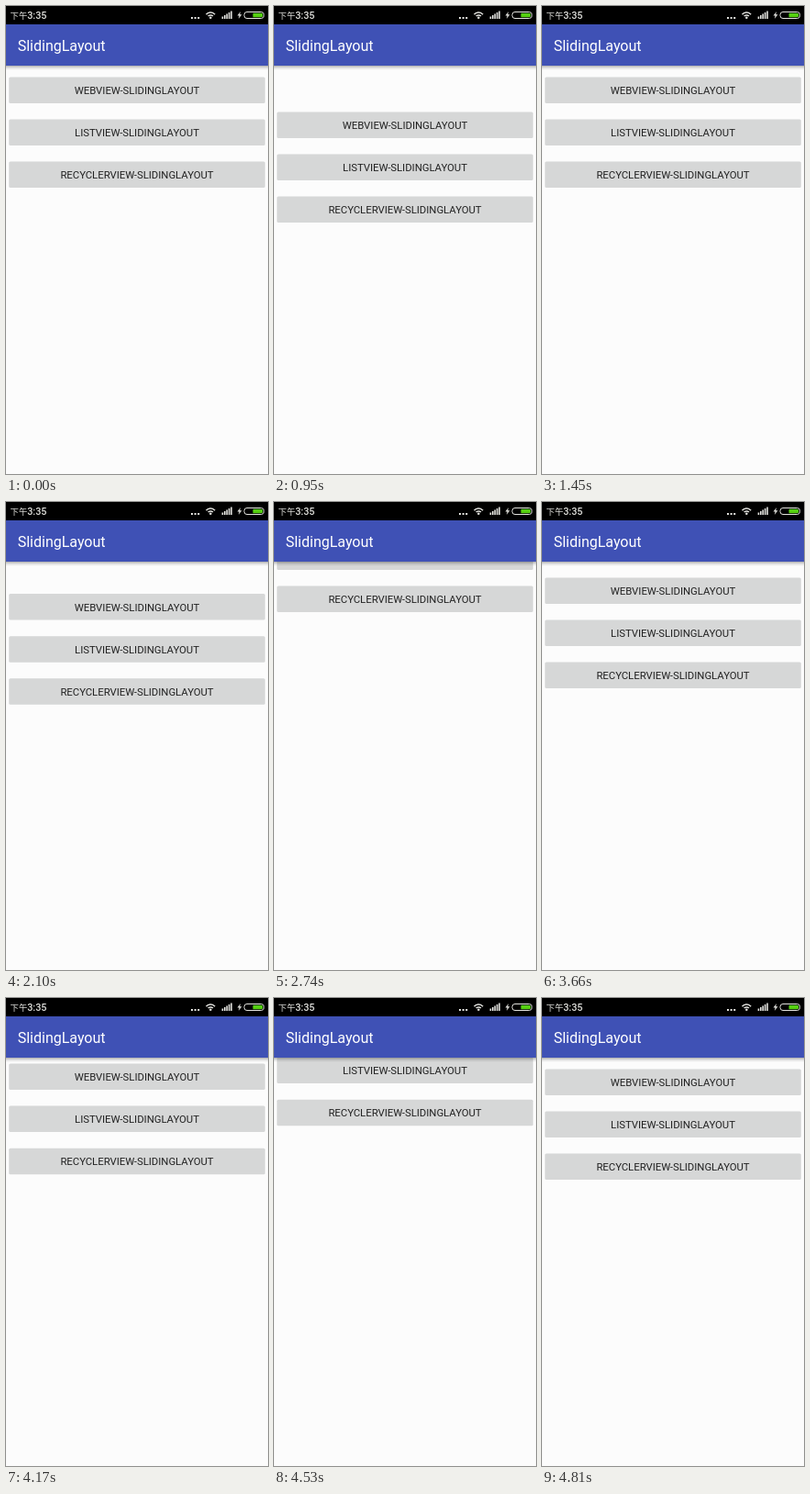
An HTML page with a canvas that plays this animation: 286 by 510 pixels, repeating every 4.84 s.

```html
<!DOCTYPE html>
<html lang="zh">
<head>
<meta charset="utf-8">
<title>SlidingLayout</title>
<style>
html, body { margin: 0; width: 100%; height: 100%; overflow: hidden; background: #fcfcfc; }
canvas { display: block; width: 286px; height: 510px; }
</style>
</head>
<body>
<canvas id="stage" width="286" height="510"></canvas>
<script>
const ctx = document.getElementById('stage').getContext('2d');
const LOOP = 4840;
const LIGHT = '#e2e2de';
const LABELS = ['WEBVIEW', 'LISTVIEW', 'RECYCLERVIEW'].map(name => name + '-SLIDINGLAYOUT');

// Each drag: number of screen updates and [time, offset] points along the finger's path,
// ending with the release back to rest.
const DRAGS = [
  { steps: 27, keys: [[700, 4], [950, 38], [1205, 71], [1450, 0]] },
  { steps: 15, keys: [[1760, 6], [1950, 75], [2180, 0]] },
  { steps: 28, keys: [[2460, -6], [2740, -78], [2960, -16], [3030, 26], [3240, 0]] },
  { steps: 41, keys: [[3660, 5], [3900, 68], [4165, -6], [4440, -75], [4700, 17], [4745, 45], [4810, 0]] }
];

const slope = ([t0, y0], [t1, y1]) => (y1 - y0) / (t1 - t0);

// Abrupt start, soft stop, flat at turning points.
function tangent(keys, i) {
  if (i === 0) return slope(keys[0], keys[1]);
  if (i === keys.length - 1) return 0;
  const before = slope(keys[i - 1], keys[i]);
  const after = slope(keys[i], keys[i + 1]);
  return before * after <= 0 ? 0 : 2 * before * after / (before + after);
}

function hermite(keys, t) {
  const i = Math.max(1, keys.findIndex(key => key[0] > t));
  const [t0, y0] = keys[i - 1];
  const [t1, y1] = keys[i];
  const span = t1 - t0;
  const p = (t - t0) / span;
  const q = 1 - p;
  return y0 * (1 + 2 * p) * q * q + y1 * (3 - 2 * p) * p * p
    + span * p * q * (tangent(keys, i - 1) * q - tangent(keys, i) * p);
}

function slideOffset(time) {
  const drag = DRAGS.find(({ keys }) => time >= keys[0][0] && time < keys[keys.length - 1][0]);
  if (!drag) return 0;
  const { keys, steps } = drag;
  const start = keys[0][0];
  const step = (keys[keys.length - 1][0] - start) / steps;
  return hermite(keys, start + Math.floor((time - start) / step + 1e-6) * step);
}

function rect(x, y, w, h, color) {
  ctx.fillStyle = color;
  ctx.fillRect(x, y, w, h);
}

function pill(x, y, w, h, r) {
  ctx.beginPath();
  ctx.roundRect(x, y, w, h, r);
}

function text(str, x, y, font, color, align = 'left') {
  ctx.font = font;
  ctx.fillStyle = color;
  ctx.textAlign = align;
  ctx.fillText(str, x, y);
}

function drawButtons(offset) {
  LABELS.forEach((label, i) => {
    const y = 77.4 + i * 46.1 + offset;
    pill(3.2, y, 279.6, 28.5, 1.5);
    ctx.fillStyle = '#d6d7d7';
    ctx.fill();
    text(label, 143, Math.round(y + 18.6), '11.3px Roboto, sans-serif', '#212121', 'center');
  });
}

function drawToolbar() {
  const shadow = ctx.createLinearGradient(0, 65, 0, 70);
  shadow.addColorStop(0, 'rgba(0,0,0,.3)');
  shadow.addColorStop(0.5, 'rgba(0,0,0,.1)');
  shadow.addColorStop(1, 'rgba(0,0,0,0)');
  rect(0, 65, 286, 5, shadow);
  rect(0, 20, 286, 45, '#3f51b5');
  text('SlidingLayout', 12.7, 49, '16px Roboto, sans-serif', '#fff');
}

function drawWifi(x, y) {
  ctx.strokeStyle = LIGHT;
  ctx.lineWidth = 1.5;
  for (const r of [3.6, 6.4]) {
    ctx.beginPath();
    ctx.arc(x, y, r, -Math.PI * 0.77, -Math.PI * 0.23);
    ctx.stroke();
  }
  ctx.beginPath();
  ctx.arc(x, y - 0.8, 1.3, 0, Math.PI * 2);
  ctx.fillStyle = LIGHT;
  ctx.fill();
}

function drawStatusBar() {
  rect(0, 0, 286, 20, '#000');
  text('下午', 4.6, 13.5, '500 9.4px "Noto Sans CJK SC", "Noto Sans CJK", sans-serif', LIGHT);
  text('3:35', 23.2, 14, '500 10.8px Roboto, sans-serif', LIGHT);
  for (let i = 0; i < 3; i++) rect(202 + i * 3.6, 12, 2, 2, LIGHT);
  drawWifi(223.3, 13.5);
  for (let i = 0; i < 5; i++) {
    const h = 2.5 + i * 1.5;
    rect(235.6 + i * 2.4, 14 - h, 1.6, h, LIGHT);
  }
  ctx.beginPath();
  [[256, 6], [252.5, 10.6], [254.6, 10.6], [253.8, 14], [257.4, 9.2], [255.2, 9.2]]
    .forEach(([x, y]) => ctx.lineTo(x, y));
  ctx.fillStyle = LIGHT;
  ctx.fill();
  pill(260, 6.5, 21.5, 7, 3);
  ctx.strokeStyle = LIGHT;
  ctx.lineWidth = 1;
  ctx.stroke();
  pill(269.5, 7.8, 10.8, 4.4, [0.5, 2, 2, 0.5]);
  ctx.fillStyle = '#55d010';
  ctx.fill();
}

function draw() {
  const time = performance.now() % LOOP;
  rect(0, 0, 286, 510, '#fcfcfc');
  drawButtons(slideOffset(time));
  drawToolbar();
  drawStatusBar();
  requestAnimationFrame(draw);
}

draw();
</script>
</body>
</html>
```
